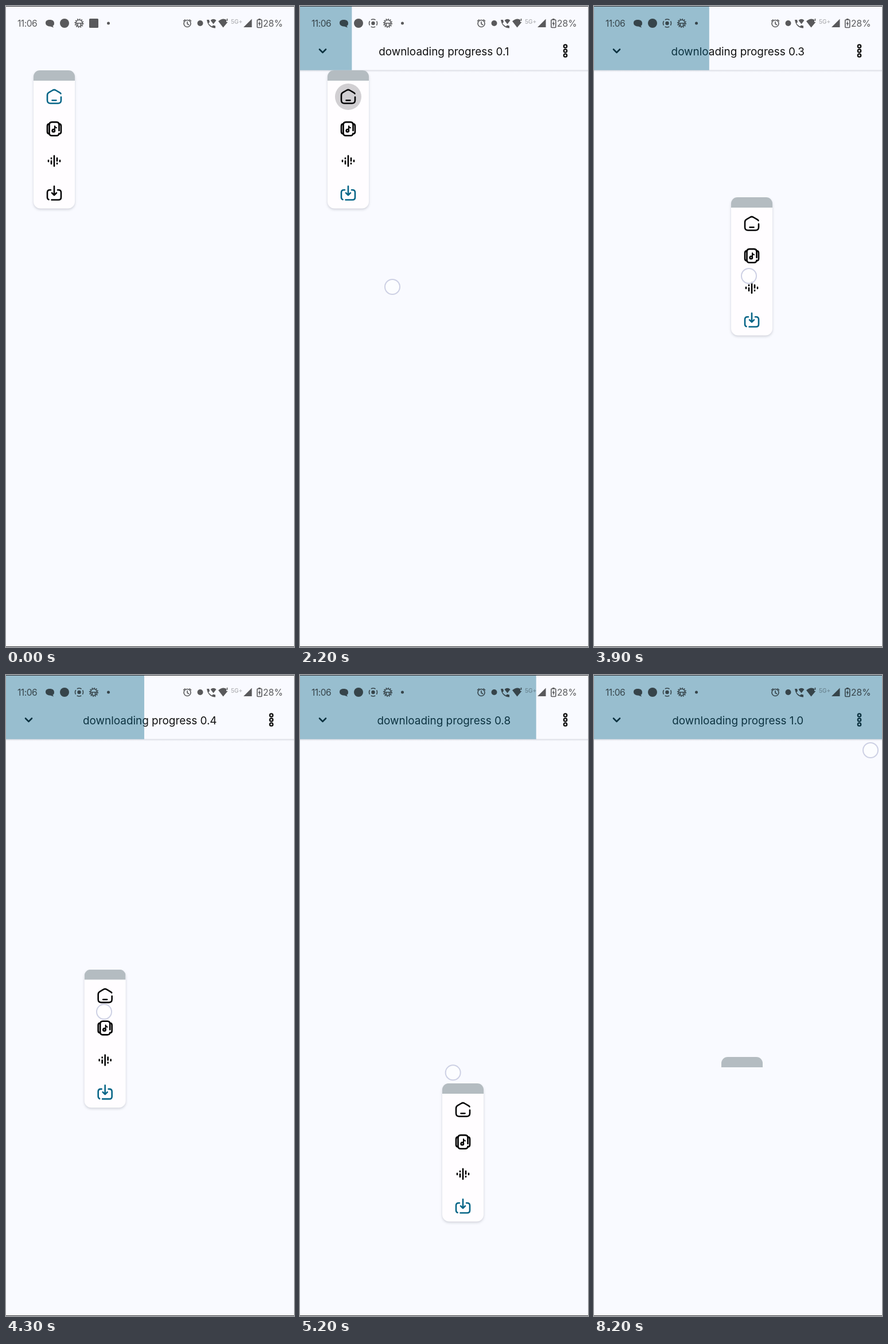
Recreate the animation shown at these times as an HTML page. Size 502 px wide and 1116 px high, loop 8300 ms.

```html
<!DOCTYPE html>
<html lang="en">
<head>
<meta charset="utf-8">
<title>Floating panel</title>
<style>
html, body { margin: 0; width: 100%; height: 100%; overflow: hidden; background: #f9faff; }
svg { display: block; width: 502px; height: 1116px; }
text { font-family: Inter, "Open Sans", sans-serif; }
.line { fill: none; stroke: currentColor; stroke-width: 2.6; stroke-linecap: round; stroke-linejoin: round; }
.thin { fill: none; stroke: #000; stroke-width: 1.6; }
#body { filter: drop-shadow(0 2px 2px rgba(60, 65, 80, .22)); }
</style>
</head>
<body>
<svg viewBox="0 0 502 1116">
  <defs>
    <clipPath id="cut"><rect id="cutBox" x="-10" width="92"/></clipPath>
    <clipPath id="gripCut"><path d="M0 18V11A11 11 0 0 1 11 0H61A11 11 0 0 1 72 11V18Z"/></clipPath>
    <radialGradient id="soft">
      <stop offset=".55" stop-color="#60656a"/>
      <stop offset="1" stop-color="#60656a" stop-opacity="0"/>
    </radialGradient>
    <linearGradient id="shade" x2="0" y2="1">
      <stop stop-color="#41485a" stop-opacity=".2"/>
      <stop offset="1" stop-color="#41485a" stop-opacity="0"/>
    </linearGradient>
  </defs>

  <g id="header">
    <rect y="111" width="502" height="4" fill="url(#shade)"/>
    <rect width="502" height="111.5" fill="#f9faff"/>
    <path class="line" d="M34 75.5l5.5 5.5 5.5-5.5" color="#111"/>
    <text id="label" x="250.8" y="85.6" font-size="18.9" text-anchor="middle" fill="#111"></text>
    <g fill="none" stroke="#111" stroke-width="2.3">
      <circle cx="462.5" cy="70" r="2.7"/><circle cx="462.5" cy="78" r="2.7"/><circle cx="462.5" cy="86" r="2.7"/>
    </g>
    <rect id="band" height="111.7" fill="#066587" fill-opacity=".4"/>
  </g>

  <g opacity=".64">
    <text x="20" y="36" font-size="15.6" letter-spacing="-.5">11:06</text>
    <path d="M69 29.5C69 25.5 72 24 76.5 24S84 26 84 30c0 3-1 4-2.5 4.5L83 37.5 77 35.5C72 35.5 69 33 69 29.5Z"/>
    <circle cx="102" cy="30" r="8"/>
    <g id="record" transform="translate(127.5 30)">
      <circle r="7" class="thin" stroke-dasharray="8 3" stroke-dashoffset="4"/>
      <circle r="3.2"/>
    </g>
    <g id="gear">
      <circle r="5.7" class="thin"/>
      <circle r="7.3" class="thin" stroke-dasharray="1.9 1.92"/>
      <path class="thin" d="M-6 0H6M-2.5 0V4M2.5 0V4"/>
    </g>
    <rect id="square" x="145" y="22" width="16" height="16" rx="1.5"/>
    <circle cx="178.5" cy="30" r="2.5"/>

    <circle cx="316" cy="30.5" r="6" class="thin"/>
    <path class="thin" d="M316 27V31L319 33M309 26.5L312.5 23.5M323 26.5L319.5 23.5"/>
    <circle cx="338.5" cy="30" r="5"/>
    <path d="M350 24H354L355 28 353 30Q355 34 359 35.5L361 33.5 365 34.5V38.5Q352 38 350 24Z"/>
    <path d="M356.5 25Q361.5 20.5 366.5 25L361.5 31.5Z"/>
    <path d="M370 26.5Q378 20 384 24V28H386.5L378.5 37.5Z"/>
    <path class="thin" d="M385.5 22V26"/>
    <text x="392" y="30.5" font-size="10" font-weight="600" opacity=".42">5G+</text>
    <path d="M428.5 22.5V37H414Z"/>
    <rect x="437.8" y="24" width="8" height="13.5" rx="1.2" class="thin"/>
    <path d="M440 22H443.6V24H440ZM442.8 25.5L439.4 31.3H441.4L440.8 36 444.3 29.8H442.3Z"/>
    <text x="448" y="36" font-size="15.7">28%</text>
  </g>

  <g id="panel">
    <g id="content" clip-path="url(#cut)">
      <rect id="corners" y="220" width="72" height="20" fill="#e0e3e7"/>
      <rect id="body" width="72" height="240.5" rx="12" fill="#fffdff"/>
      <circle id="homeTap" cx="36" cy="46" r="23" fill="#66636a"/>
      <circle id="loadTap" cx="36" cy="213.5" r="22" fill="#66636a"/>
      <g id="home" class="line icon">
        <path d="M11.5-5.5Q10.5-6.8 9-7.6L2.3-11.5Q0-12.7-2.3-11.5L-9-7.6Q-12-6-12-2.5V6Q-12 11.5-6.5 11.5H6.5Q12 11.5 12 6V.5M-3.5 6.3H3.5"/>
      </g>
      <g class="line icon">
        <path d="M8.5 3V-7Q8.5-11.8 4-11.8H-4Q-8.5-11.8-8.5-7V7Q-8.5 11.8-4 11.8H4Q8 11.8 8.5 8"/>
        <path d="M-8.5-8.8Q-12-8.5-12-5V5Q-12 8.5-8.5 8.8M8.5-8.8Q12-8.5 12-5V5Q12 8.5 8.5 8.8"/>
        <path d="M1 3V-5Q1.5-2.2 4-1.8" stroke-width="2"/>
        <circle cx="-1.2" cy="3" r="2.2"/>
      </g>
      <path class="line icon" d="M-10-1V1M-5-5V-4M-5 0V5M0-9V9M5-5V0M5 4V5M10-1V1"/>
      <g id="load" class="line icon">
        <path d="M0-12V3.5M-4-.3L0 3.7 4-.3"/>
        <path d="M-6-5.5H-7.5Q-12-5.5-12-1V7Q-12 10.5-9.5 11.3M-4.5 11.8H7.5Q12 11.8 12 7.3V-1Q12-5.5 7.5-5.5H6"/>
      </g>
    </g>
    <g clip-path="url(#gripCut)">
      <rect width="72" height="18" fill="#b4bcc1"/>
      <circle id="gripTap" cx="30" cy="10" r="29" fill="url(#soft)"/>
    </g>
  </g>

  <circle id="ring" r="13" fill="#fff" fill-opacity=".5" stroke="#cdd0e4" stroke-width="2"/>
  <path d="M0 .5H502M0 1115.5H502" stroke="#333438"/>
</svg>
<script>
const LOOP = 8300, STEP = 100, BLUE = '#066587', INK = '#050506';
const LEAD = 200; // the panel trails the finger by this much
const $ = id => document.getElementById(id);

// paths of [time, x, y]
const drag = [[3100, 48, 112], [3900, 239, 333], [4100, 234, 458], [4400, 88, 540],
  [4700, 229, 643], [4900, 253, 671], [5200, 248, 711], [5500, 222, 665]];
const strokes = [
  [[1800, 37, 363], [2000, 84, 158], [2200, 161, 489]],
  [[6500, 239, 669], [6700, 463, 39]],
  [[8200, 482, 131], [LOOP, 482, 131]]
];

const clamp = v => Math.min(1, Math.max(0, v));
const ramp = (t, a, b) => clamp((t - a) / (b - a));
const pulse = (t, a, peak, b) => ramp(t, a, peak) * (1 - ramp(t, peak, b));
const within = (t, a, b) => t >= a && t <= b;

function along(path, t) {
  const n = Math.max(1, path.findIndex(k => k[0] >= t));
  if (t >= path.at(-1)[0]) return path.at(-1).slice(1);
  const [t0, x0, y0] = path[n - 1], [t1, x1, y1] = path[n];
  const u = ramp(t, t0, t1);
  return [x0 + (x1 - x0) * u, y0 + (y1 - y0) * u];
}

function finger(t) {
  if (within(t, 2800, 5300)) {
    const [x, y] = along(drag, t + LEAD);
    return [x + 36, y + 12];
  }
  const path = strokes.find(s => within(t, s[0][0], s.at(-1)[0]));
  return path && along(path, t);
}

// steady at first, rushing at the end, in whole percent
function progress(t) {
  const u = ramp(t, 300, 5500);
  return Math.round(50 * (u + u ** 6.2)) / 100;
}

const show = (id, on) => $(id).style.display = on ? '' : 'none';
const place = (el, x, y) => el.setAttribute('transform', `translate(${x} ${y})`);
const fade = (id, v) => $(id).setAttribute('opacity', v);

function draw(now) {
  const t = Math.floor(now % LOOP / STEP) * STEP;
  const open = t >= 400, folding = t >= 5900;

  const p = progress(t);
  const shown = p < 1 ? Math.max(0, Math.floor(p * 10 - .001)) / 10 : 1;
  show('header', open);
  $('band').setAttribute('width', 502 * p);
  $('label').textContent = 'downloading progress ' + shown.toFixed(1);

  show('record', open);
  show('square', !open);
  place($('gear'), open ? 153 : 127.5, 30);
  $('home').style.color = t < 300 ? BLUE : INK;
  $('load').style.color = t < 300 ? INK : BLUE;

  place($('panel'), ...along(drag, t));
  fade('loadTap', .3 * pulse(t, 0, 200, 700));
  fade('homeTap', .3 * pulse(t, 1900, 2200, 2500));
  fade('gripTap', .5 * pulse(t, 5700, 6000, 6200));

  // the menu folds into its grip
  show('content', t < 6200);
  show('corners', folding);
  $('body').style.filter = folding ? 'none' : '';
  $('cutBox').setAttribute('height', folding ? 240.5 - 222 * ramp(t, 6000, 6200) : 260);

  const spot = finger(t);
  show('ring', spot);
  if (spot) place($('ring'), ...spot);
}

document.querySelectorAll('.icon').forEach((el, i) => place(el, 36, 46 + 55.9 * i));

const start = performance.now();
function tick() {
  draw(performance.now() - start);
  requestAnimationFrame(tick);
}
tick();
</script>
</body>
</html>
```
